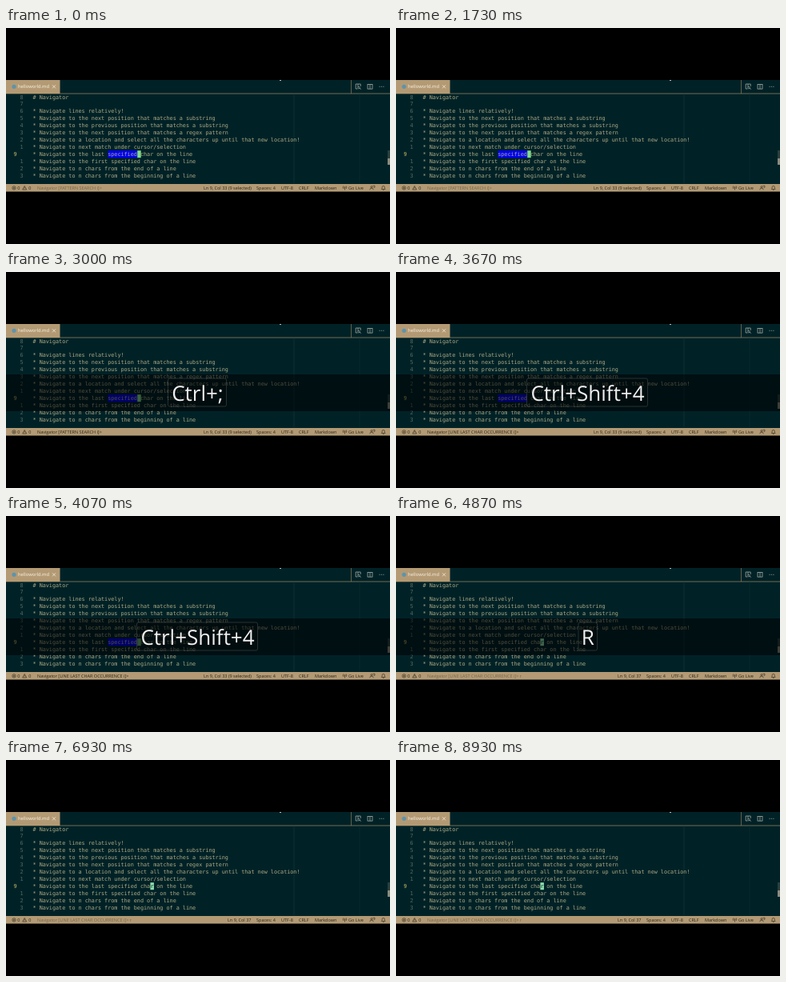
Recreate the animation shown at these times as an HTML page. Size 480 px wide and 270 px high, loop 9070 ms.

```html
<!DOCTYPE html>
<html lang="en">
<head>
<meta charset="utf-8">
<title>Navigator</title>
<style>
html, body { margin: 0; width: 100%; height: 100%; overflow: hidden; background: #000; }
svg { display: block; width: 480px; height: 270px; }
text { font-family: "Open Sans", "Noto Sans", sans-serif; text-rendering: geometricPrecision; white-space: pre; }
.code text { font: 6.78px "DejaVu Sans Mono", monospace; fill: #b0aa84; }
.code .num { fill: #536963; }
.code .now { fill: #c9bc63; }
.status { font-size: 5.5px; fill: #2a2419; }
.status path, .status circle, .icons path, .icons rect { fill: none; stroke-width: .6; }
.status path, .status circle { stroke: #2a2419; }
.icons path, .icons rect { stroke: #d5d2c4; }
.dim { fill: #76654a; }
.keys text { font-size: 26px; fill: #f0f0f0; text-anchor: middle; }
.keys .band { fill: #000; fill-opacity: .55; }
.keys .box { fill: #000; fill-opacity: .2; stroke: #5c6460; stroke-opacity: .6; stroke-width: .7; }

.cut { animation: 9070ms step-end infinite; }
#caretA { animation-name: caretA; }
#caretB { animation-name: caretB; }
#before { animation-name: before; }
#after { animation-name: after; }
#searchIdle { animation-name: searchIdle; }
#searchOn { animation-name: searchOn; }
#lastOn { animation-name: lastOn; }
#key1 { animation-name: key1; }
#key2 { animation-name: key2; }
#key3 { animation-name: key3; }

@keyframes caretA {
  0%, 8.04%, 19.07%, 30.09%, 41.12%, 52.14% { visibility: visible; }
  2.2%, 13.23%, 24.25%, 35.28%, 46.3%, 53.69%, 100% { visibility: hidden; }
}
@keyframes caretB {
  0%, 59.53%, 70.56%, 82.35%, 92.61% { visibility: hidden; }
  53.69%, 64.71%, 76.4%, 87.43%, 98.45%, 100% { visibility: visible; }
}
@keyframes before { 0% { visibility: visible; } 53.69%, 100% { visibility: hidden; } }
@keyframes after { 0% { visibility: hidden; } 53.69%, 100% { visibility: visible; } }
@keyframes searchIdle { 0% { visibility: visible; } 27.89%, 100% { visibility: hidden; } }
@keyframes searchOn { 0%, 38.25%, 100% { visibility: hidden; } 27.89% { visibility: visible; } }
@keyframes lastOn { 0%, 53.69%, 100% { visibility: hidden; } 38.25% { visibility: visible; } }
@keyframes key1 { 0%, 37.48%, 100% { visibility: hidden; } 27.89% { visibility: visible; } }
@keyframes key2 { 0%, 47.73%, 100% { visibility: hidden; } 38.25% { visibility: visible; } }
@keyframes key3 { 0%, 63.17%, 100% { visibility: hidden; } 53.69% { visibility: visible; } }
</style>
</head>
<body>
<svg viewBox="0 0 480 270">
  <rect width="480" height="270" fill="#000"/>
  <rect y="65" width="480" height="139.5" fill="#002227"/>

  <!-- tab bar -->
  <rect y="81.6" width="480" height=".8" fill="#8f7d5c"/>
  <rect x="431" y="65" width=".7" height="17" fill="#8f7d5c"/>
  <rect y="65" width="67.5" height="17" fill="#b39a74"/>
  <circle cx="10" cy="73.3" r="2.6" fill="#5b94ad"/>
  <text x="15" y="75.4" font-size="5.8" fill="#fbf4e6">helloworld.md</text>
  <path d="M58 71.3l4 4m0-4l-4 4" stroke="#fbf4e6" stroke-width=".7"/>
  <rect x="342" y="65" width="2" height="1" fill="#bbb"/>
  <g class="icons">
    <path d="M439.5 76h-2.300v-6h6v3M440 70v4"/>
    <path d="M441 73.500a1.200 1.200 0 1 0 .1 0M442 75l1.700 1.700"/>
    <rect x="452" y="70.300" width="6" height="5.800"/>
    <path d="M455 70.300v5.800"/>
    <path d="M466.500 73.300h1.200m1.200 0h1.200m1.200 0h1.200" stroke-width="1.100"/>
  </g>

  <!-- editor -->
  <rect x="359.700" y="82.400" width=".6" height="112" fill="#17393b"/>
  <rect x="441.700" y="82.400" width=".6" height="112" fill="#0d2f33"/>
  <rect x="477" y="153" width="3" height="18" fill="#28403f"/>
  <rect x="477" y="163" width="3" height="8" fill="#8b8c7c"/>
  <rect id="before" class="cut" x="127.300" y="153.200" width="36.800" height="9" fill="#0000f5"/>
  <g class="code" id="code"></g>
  <rect id="caretA" class="cut" x="164.200" y="153.200" width="4.500" height="9" fill="#7fdc8c"/>
  <g id="caretB" class="cut">
    <rect x="180.400" y="153.200" width="4.500" height="9" fill="#8fe0ae"/>
    <g class="code"><text x="180.400" y="160.100" style="fill:#00282c">r</text></g>
  </g>

  <!-- status bar -->
  <rect y="195" width="480" height="9.500" fill="#b39a74"/>
  <g class="status">
    <circle cx="10" cy="199.900" r="2.200"/>
    <path d="M9 198.900l2 2m0-2l-2 2"/>
    <text x="14.200" y="201.900">0</text>
    <path d="M20.700 202l2.500-4.500 2.500 4.500zM23.200 199v1.500"/>
    <text x="28.300" y="201.900">0</text>
    <text id="searchIdle" class="cut dim" x="39" y="201.900">Navigator [PATTERN SEARCH i]&gt;</text>
    <text id="searchOn" class="cut" x="39" y="201.900">Navigator [PATTERN SEARCH i]&gt;</text>
    <text id="lastOn" class="cut" x="39" y="201.900">Navigator [LINE LAST CHAR OCCURRENCE i]&gt;</text>
    <g id="after" class="cut">
      <text class="dim" x="39" y="201.900">Navigator [LINE LAST CHAR OCCURRENCE i]&gt; r</text>
      <text x="277" y="201.900">Ln 9, Col 37</text>
    </g>
    <g class="cut" style="animation-name:before"><text x="247" y="201.900">Ln 9, Col 33 (9 selected)</text></g>
    <text x="313" y="201.900">Spaces: 4</text>
    <text x="344" y="201.900">UTF-8</text>
    <text x="366" y="201.900">CRLF</text>
    <text x="386" y="201.900">Markdown</text>
    <text x="428" y="201.900">Go Live</text>
    <circle cx="423.500" cy="199.300" r=".7"/>
    <path d="M423.500 200v2.500M421.800 197.500q-1.300 1.800 0 3.500M425.200 197.500q1.300 1.800 0 3.500"/>
    <circle cx="457" cy="198.700" r="1.100"/>
    <path d="M454.800 202.300q0-2.200 2.200-2.200t2.200 2.200M458.500 197.300h2.500v2h-1.500"/>
    <path d="M469.300 201.500h4.800l-.8-1.200v-1.300q0-1.600-1.600-1.600t-1.600 1.600v1.300zM471 202.500h1.400"/>
  </g>

  <!-- pressed keys -->
  <g class="keys">
    <g id="key1" class="cut">
      <rect class="band" y="128" width="480" height="46"/>
      <rect class="box" x="202.500" y="133" width="73" height="35" rx="2"/>
      <text x="239.500" y="161.200">Ctrl+;</text>
    </g>
    <g id="key2" class="cut">
      <rect class="band" y="128" width="480" height="46"/>
      <rect class="box" x="163.500" y="133" width="151" height="35" rx="2"/>
      <text x="239.500" y="161.200">Ctrl+Shift+4</text>
    </g>
    <g id="key3" class="cut">
      <rect class="band" y="128" width="480" height="46"/>
      <rect class="box" x="228" y="133" width="23.500" height="35" rx="2"/>
      <text x="239.800" y="161.200">R</text>
    </g>
  </g>
</svg>
<script>
const lines = [
  "# Navigator",
  "",
  "* Navigate lines relatively!",
  "* Navigate to the next position that matches a substring",
  "* Navigate to the previous position that matches a substring",
  "* Navigate to the next position that matches a regex pattern",
  "* Navigate to a location and select all the characters up until that new location!",
  "* Navigate to next match under cursor/selection",
  "* Navigate to the last specified char on the line",
  "* Navigate to the first specified char on the line",
  "* Navigate to n chars from the end of a line",
  "* Navigate to n chars from the beginning of a line"
];
const code = document.getElementById("code");
const current = 8;

function addText(str, x, y, cls) {
  const el = document.createElementNS("http://www.w3.org/2000/svg", "text");
  el.setAttribute("x", x);
  el.setAttribute("y", y);
  if (cls) el.setAttribute("class", cls);
  el.textContent = str;
  code.append(el);
}

lines.forEach((line, i) => {
  const y = 88.5 + 8.95 * i;
  const here = i === current;
  addText(here ? "9" : Math.abs(i - current), here ? 9.4 : 17.6, y, here ? "now" : "num");
  addText(line, 33.5, y);
});
</script>
</body>
</html>
```
